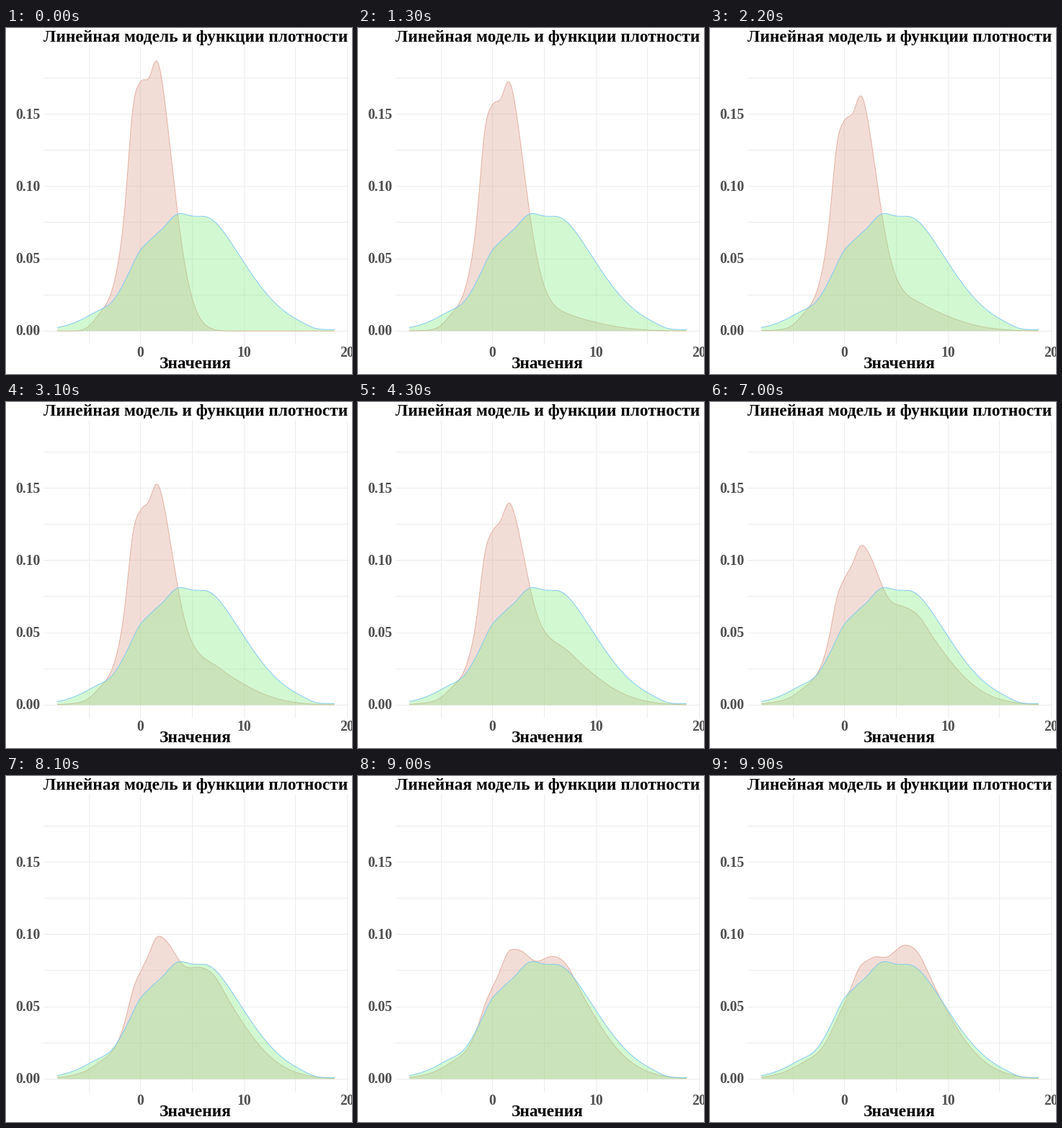
These frames come from a looping animation (480x480 px, 10000 ms). A matplotlib script:

```python
import numpy as np
import matplotlib.pyplot as plt
from matplotlib.animation import FuncAnimation

SIZE, DPI = 480, 96
FRAMES, INTERVAL = 100, 100
LEFT, TOP, RIGHT, BOTTOM = 52, 26, 474, 438

# Each density is a sum of bells: (height, centre, spread).
START = [(0.2012, 1.04, 1.884), (-0.0245, 0.81, 0.475),
         (0.0265, -0.795, 0.447), (0.0065, -3.87, 0.80)]
END = [(0.0969, 4.717, 4.327), (-0.0055, -2.12, 1.05), (0.0047, 1.37, 0.523),
       (-0.0115, 4.16, 0.907), (0.004, 7.16, 0.768)]
FIXED = [(0.0872, 4.717, 4.78), (-0.0052, -2.68, 0.977), (0.003, -0.17, 0.558),
         (-0.0042, 2.24, 0.768), (-0.0075, 5.0, 1.047), (-0.0015, 17.0, 0.84)]

values = np.linspace(-8.05, 18.74, 512)


def density(bells):
    return sum(h * np.exp(-((values - c) / s) ** 2 / 2) for h, c, s in bells)


def x_px(v):
    return 186.4 + 14.33 * v


def y_px(v):
    return 419.9 - 2006 * v


def pt(px):
    return px * 72 / DPI


# Curves run through pixel centres.
xs = x_px(values) + 0.5


def rows(d):
    return y_px(d) + 0.5


def outline(d):
    base = rows(0)
    return np.column_stack([np.r_[xs, xs[-1], xs[0]], np.r_[rows(d), base, base]])


fig = plt.figure(figsize=(SIZE / DPI, SIZE / DPI), dpi=DPI, facecolor="white")
ax = fig.add_axes([0, 0, 1, 1])
ax.set(xlim=(0, SIZE), ylim=(SIZE, 0))
ax.axis("off")


def label(x, y, text, size, color="black", ha="center"):
    ax.text(x, y, text, fontsize=pt(size), color=color, ha=ha, va="baseline",
            family="Liberation Serif", weight="bold")


def area(d, fill, stroke, z):
    patch, = ax.fill(*outline(d).T, facecolor=fill, alpha=0.4, linewidth=0,
                     zorder=z)
    line, = ax.plot(xs, rows(d), color=stroke, linewidth=pt(0.9), zorder=z + 0.5)
    return patch, line


grid = dict(color="#EBEBEB", linewidth=pt(1), antialiased=False, zorder=0)
for v in range(-5, 21, 5):
    ax.plot([x_px(v)] * 2, [TOP, BOTTOM], **grid)
for v in np.arange(0, 0.18, 0.025):
    ax.plot([LEFT, RIGHT], [y_px(v)] * 2, **grid)

for v in (0, 10, 20):
    label(x_px(v), 456.5, str(v), 19.6, "#4D4D4D")
for v in (0, 0.05, 0.10, 0.15):
    label(47.5, y_px(v) + 6.5, f"{v:.2f}", 19.6, "#4D4D4D", "right")
label(52.5, 18.5, "Линейная модель и функции плотности", 23.4, ha="left")
label(262.5, 472.5, "Значения", 23.4)

first, last = density(START), density(END)
patch, line = area(first, "#DFAA99", "#E2AB9B", 2)
area(density(FIXED), "#90EE90", "#7AC8F5", 4)


def update(i):
    t = i / (FRAMES - 1)
    d = (1 - t) * first + t * last
    patch.set_xy(outline(d))
    line.set_ydata(rows(d))
    return patch, line


anim = FuncAnimation(fig, update, frames=FRAMES, interval=INTERVAL,
                     repeat=True, repeat_delay=0)
plt.show()
```
